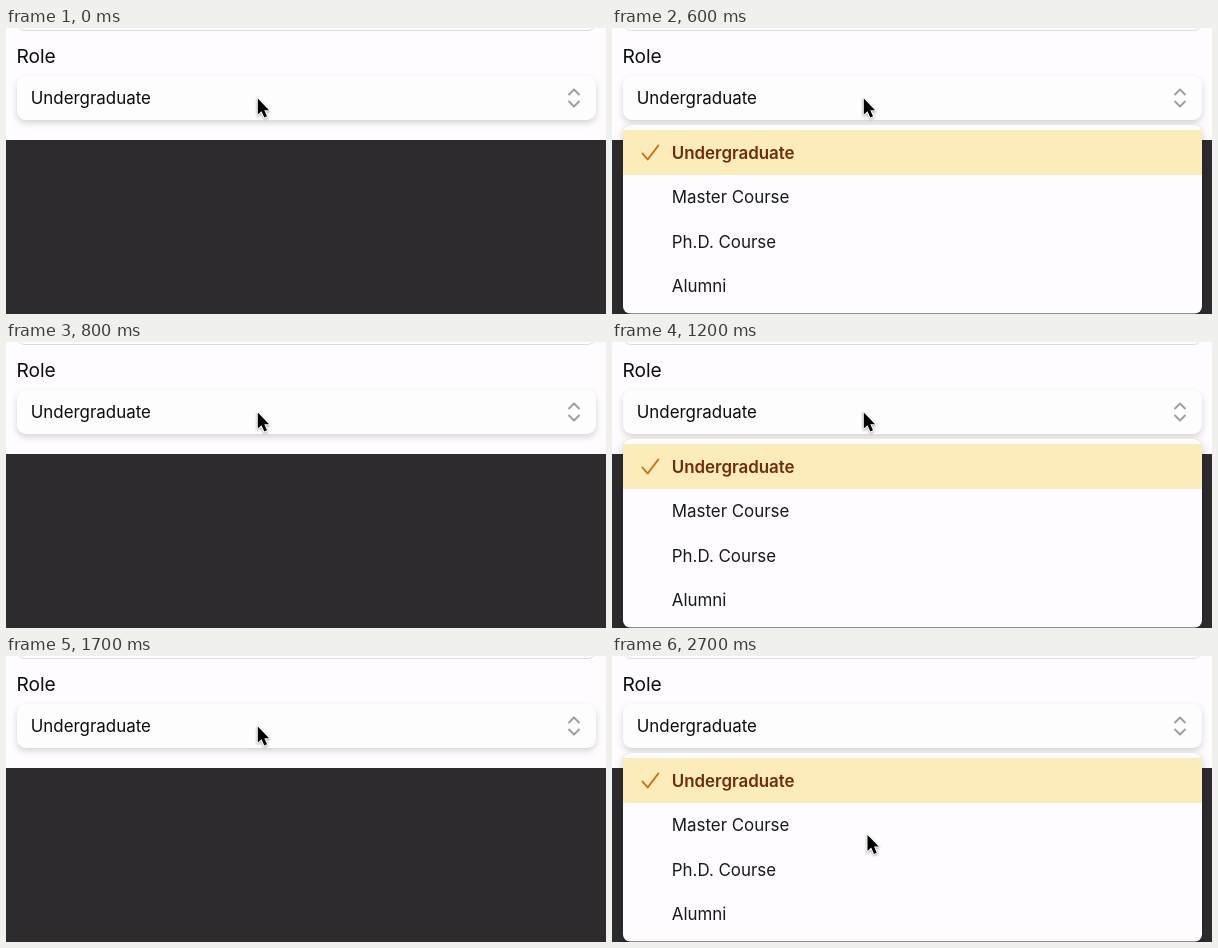
Animation of 600 by 286 pixels, one loop 2800 ms. Source, as an HTML page:

```html
<!DOCTYPE html>
<html lang="en">
<head>
<meta charset="utf-8">
<title>Role select</title>
<style>
  html, body { margin: 0; width: 100%; height: 100%; overflow: hidden; background: #2d2b2d; }
  svg { display: block; width: 100%; height: 100%; }
  text { font: 400 16.9px Inter, "Open Sans", sans-serif; fill: #0c0c10; }
  .label { font-size: 19.2px; }
  .list text { fill: #18181f; }
  .list .chosen { font-weight: 600; }
  .line { fill: none; stroke-linecap: round; stroke-linejoin: round; }
  .button { filter: drop-shadow(0 3px 3px rgba(0, 0, 0, .16)); }
  .panel { filter: drop-shadow(0 4px 5px rgba(0, 0, 0, .16)) drop-shadow(0 0 .6px rgba(0, 0, 0, .35)); }
  .cursor { filter: drop-shadow(0 1.5px 1px rgba(0, 0, 0, .35)); }
</style>
</head>
<body>
<svg viewBox="0 0 600 286">
  <rect width="600" height="286" fill="#2d2b2d"/>
  <rect width="600" height="112" fill="#fefcfe"/>
  <rect x="11.5" y="-40" width="577.5" height="42.5" rx="7" fill="#fefcfe" stroke="#dcdbe0"/>
  <text class="label" x="10.4" y="35.2">Role</text>

  <rect class="button" x="11" y="48" width="579" height="44" rx="9" fill="#fefdfe"/>
  <text x="24.8" y="76.3">Undergraduate</text>
  <path class="line" stroke="#9b9ba3" stroke-width="1.8" d="M563 66.5l5-5 5 5M563 73.5l5 5 5-5"/>

  <g class="list">
    <g id="panel">
      <rect class="panel" x="11" y="97" width="579" height="188.5" rx="7" fill="#fefcfe"/>
      <rect id="active" x="11" y="102" width="579" height="45" fill="#fbecba"/>
    </g>
    <path id="check" class="line" stroke-width="1.9" d="M30.5 125.5l5.2 6 10.6-14"/>
    <g id="items"></g>
  </g>

  <g id="cursor" class="cursor">
    <path d="M0 0V16L3.7 12.6 6.5 18.9 9.2 17.7 6.5 11.6H11.3Z" fill="#000"
      stroke="#fff" stroke-width="2" stroke-linejoin="round" paint-order="stroke"/>
  </g>
</svg>
<script>
  const LOOP = 2800;
  const LABELS = ["Undergraduate", "Master Course", "Ph.D. Course", "Alumni"];
  const byId = id => document.getElementById(id);
  const [panel, active, check, items, cursor] =
    ["panel", "active", "check", "items", "cursor"].map(byId);

  const rows = LABELS.map((label, i) => {
    const row = document.createElementNS("http://www.w3.org/2000/svg", "text");
    row.setAttribute("x", 59.8);
    row.setAttribute("y", 130.6 + i * 44.6);
    row.textContent = label;
    if (i === 0) row.setAttribute("class", "chosen");
    items.append(row);
    return row;
  });

  const within = (t, from, to) => t >= from && t < to;

  function draw(t) {
    const open = within(t, 200, 700) || within(t, 1200, 1700) || t >= 2200;
    const fading = within(t, 700, 800);
    const shown = open || fading ? "visible" : "hidden";
    for (const part of [panel, check, items]) part.style.visibility = shown;

    panel.style.opacity = fading ? 0.28 : 1;
    active.style.opacity = fading ? 0 : 1;
    check.style.stroke = fading ? "#b98a3f" : "#cf6a14";
    rows.forEach((row, i) => {
      row.style.fill = fading ? "#333237" : i ? "#18181f" : "#6f2b0d";
    });

    // The pointer jumps down just before the loop restarts.
    cursor.setAttribute("transform", t >= 2700 ? "translate(255.5 179)" : "translate(251.8 70.6)");
  }

  const start = performance.now();
  function tick() {
    draw((performance.now() - start) % LOOP);
    requestAnimationFrame(tick);
  }
  tick();
</script>
</body>
</html>
```
